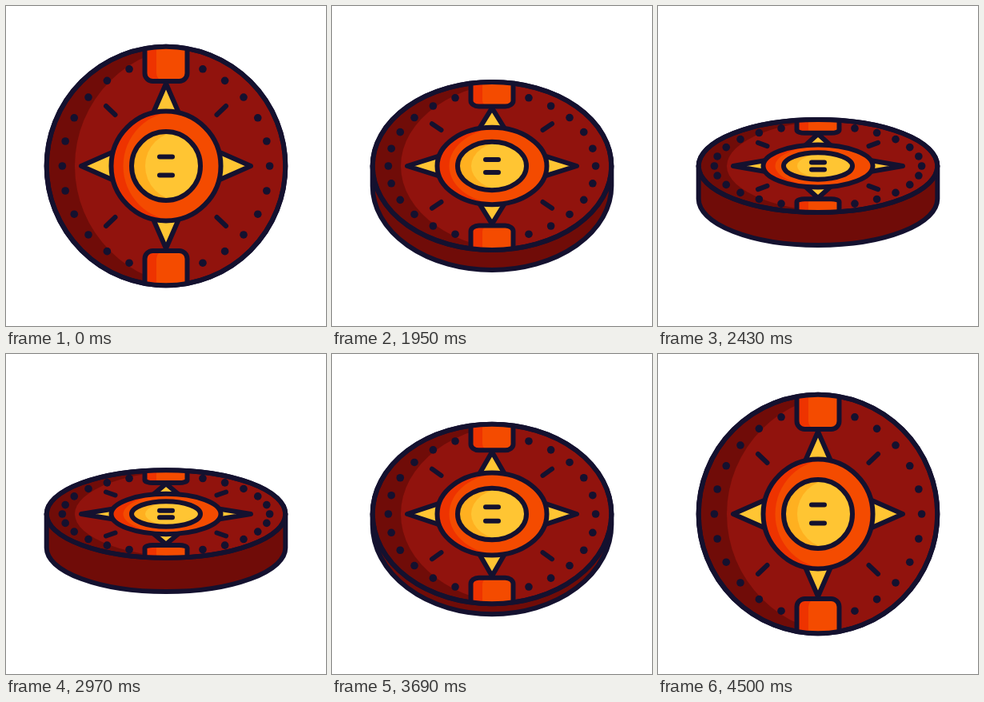
Animation, 400 px wide and 400 px high, one loop 4.53 s. Source, as an HTML page with a canvas:

```html
<!DOCTYPE html>
<html lang="en">
<head>
<meta charset="utf-8">
<title>Tilting shield</title>
<style>
html, body { margin: 0; width: 100%; height: 100%; overflow: hidden; background: #fff; }
canvas { display: block; width: 100vmin; height: 100vmin; }
</style>
</head>
<body>
<canvas id="stage" width="400" height="400"></canvas>
<script>
const ctx = document.getElementById('stage').getContext('2d');
const LOOP = 4530, STEP = 30, R = 149.3, LINE = 6;
const INK = '#14112f', RED = '#91130d', DARK = '#700c08';
const ORANGE = '#f44b00', EMBER = '#ee3300', GOLD = '#ffc533', AMBER = '#ffb020';

// [time, value]: vertical radius of the face, and visible thickness of the rim
const RADIUS = [[1500, R], [1950, 105], [2040, 93.5], [2430, 58], [2775, 52], [3120, 60],
  [3390, 76], [3660, 109], [4020, 140], [4200, 146.5], [4500, R]];
const DEPTH = [[1500, 0], [1950, 25], [2040, 31.5], [2430, 41], [2775, 42.5], [3120, 41],
  [3390, 35], [3660, 15], [3990, 0]];

function tangent(keys, i) {
  if (i === 0 || i === keys.length - 1) return 0;
  const [a, b, c] = [keys[i - 1], keys[i], keys[i + 1]];
  const h0 = b[0] - a[0], h1 = c[0] - b[0];
  return (h1 * (b[1] - a[1]) / h0 + h0 * (c[1] - b[1]) / h1) / (h0 + h1);
}

// Smooth curve through the keys, flat at both ends
function sample(keys, t) {
  const last = keys.length - 1;
  if (t <= keys[0][0]) return keys[0][1];
  if (t >= keys[last][0]) return keys[last][1];
  let i = 0;
  while (t > keys[i + 1][0]) i++;
  const [t0, v0] = keys[i], [t1, v1] = keys[i + 1];
  const h = t1 - t0, u = (t - t0) / h, w = 1 - u;
  return v0 * w * w * (1 + 2 * u) + v1 * u * u * (3 - 2 * u)
    + h * u * w * (w * tangent(keys, i) - u * tangent(keys, i + 1));
}

const disc = (r, x = 0) => { const p = new Path2D(); p.arc(x, 0, r, 0, 7); return p; };

function poly(points, closed) {
  const p = new Path2D();
  points.forEach(([x, y]) => p.lineTo(x, y));
  if (closed) p.closePath();
  return p;
}

function box(x, y, w, h, r) {
  const p = new Path2D();
  p.roundRect(x, y, w, h, r);
  return p;
}

function draw(t) {
  const ry = sample(RADIUS, t), depth = Math.max(0, sample(DEPTH, t)), s = ry / R;

  // Shapes are flattened, line weights are not
  const flat = path => {
    const p = new Path2D();
    p.addPath(path, new DOMMatrix([1, 0, 0, s, 0, 0]));
    return p;
  };
  const fill = (path, color) => { ctx.fillStyle = color; ctx.fill(flat(path)); };
  const stroke = path => ctx.stroke(flat(path));
  const shaded = (shape, light, shade, color) => {
    ctx.save();
    ctx.clip(flat(shape));
    fill(shape, shade);
    fill(light, color);
    ctx.restore();
    stroke(shape);
  };

  ctx.setTransform(1, 0, 0, 1, 0, 0);
  ctx.fillStyle = '#fff';
  ctx.fillRect(0, 0, 400, 400);
  ctx.translate(200, 200);
  ctx.lineWidth = LINE;
  ctx.lineCap = ctx.lineJoin = 'round';
  ctx.strokeStyle = INK;

  if (depth > 0.2) {
    ctx.beginPath();
    ctx.moveTo(R, 0);
    ctx.ellipse(0, depth, R, ry, 0, 0, Math.PI);
    ctx.lineTo(-R, 0);
    ctx.closePath();
    ctx.fillStyle = DARK;
    ctx.fill();
    ctx.stroke();
  }

  const face = disc(R);
  shaded(face, disc(150, 36), DARK, RED);

  ctx.fillStyle = INK;
  for (let k = 0; k < 26; k++) {
    const a = k * Math.PI / 13;
    ctx.beginPath();
    ctx.arc(129.6 * Math.cos(a), 129.6 * Math.sin(a) * s, 4.8, 0, 7);
    ctx.fill();
  }

  for (const x of [-1, 1]) for (const y of [-1, 1]) {
    stroke(poly([[75 * x, 75 * y], [63.5 * x, 64 * y]]));
  }

  for (const d of [-1, 1]) {
    for (const p of [poly([[0, 103 * d], [-17, 64 * d], [17, 64 * d]], true),
                     poly([[106 * d, 0], [64 * d, -18.5], [64 * d, 18.5]], true)]) {
      fill(p, GOLD);
      stroke(p);
    }
  }

  ctx.save();
  ctx.clip(flat(face));
  for (const y of [-170, 106]) {
    shaded(box(-26.5, y, 53, 64, 10), box(-12, y, 60, 64, 10), EMBER, ORANGE);
  }
  ctx.restore();
  stroke(face);

  shaded(disc(68.5), disc(68.5, 15), EMBER, ORANGE);
  shaded(disc(43), disc(43, 17), AMBER, GOLD);
  for (const y of [-11.5, 11.5]) stroke(poly([[-8, y], [8, y]]));
}

const start = performance.now();
function tick() {
  const t = (performance.now() - start) % LOOP;
  draw(Math.floor(t / STEP) * STEP);
  requestAnimationFrame(tick);
}
tick();
</script>
</body>
</html>
```
